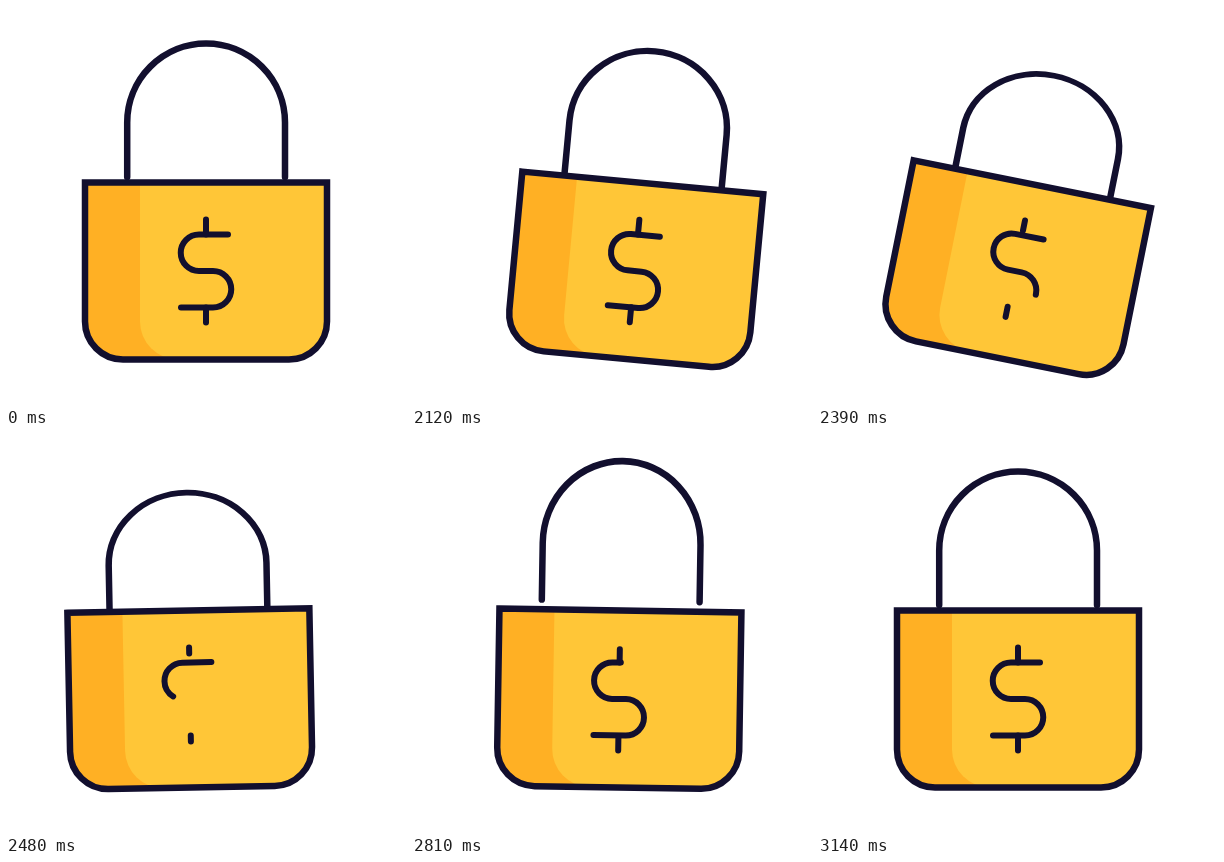
Recreate the animation shown at these times as an HTML page. Size 400 by 400 pixels, loop 3.17 s.

```html
<!DOCTYPE html>
<html lang="en">
<head>
<meta charset="utf-8">
<title>Swinging bag</title>
<style>
  html, body { margin: 0; width: 100%; height: 100%; overflow: hidden; background: #fff; }
  svg { display: block; width: 100vw; height: 100vh; }
</style>
</head>
<body>
<svg viewBox="0 0 400 400">
  <g id="bag" fill="none" stroke="#120f2e" stroke-width="6.5">
    <path id="handle" stroke-linecap="round"
      d="M121.2 171V116.5A78.9 79 0 0 1 279 116.5V171"/>
    <path fill="#ffb024" stroke="none"
      d="M79 176.5H321V315.5A38 38 0 0 1 283 353.5H117A38 38 0 0 1 79 315.5Z"/>
    <path fill="#ffc637" stroke="none"
      d="M134 176.5H321V315.5A38 38 0 0 1 283 353.5H172A38 38 0 0 1 134 315.5Z"/>
    <path d="M79 176.5H321V315.5A38 38 0 0 1 283 353.5H117A38 38 0 0 1 79 315.5Z"/>
    <g id="dollar" stroke-width="6" stroke-linecap="round">
      <path pathLength="1" d="M222 228.5H193A18.25 18.25 0 0 0 193 265H207A18.25 18.25 0 0 1 207 301.5H175"/>
      <path pathLength="1" d="M200 213.5V228.5"/>
      <path pathLength="1" d="M200 301.5V316.5"/>
    </g>
  </g>
</svg>
<script>
const LOOP = 3170, START = 2030, STEP = 30;
const $ = id => document.getElementById(id);
const bag = $('bag'), handle = $('handle'), dollar = $('dollar');

// Keys: [step, value, slope]; slope defaults to 0
const tilt = [[-1, 0], [9.4, 16.2], [20, -15.7], [28, 4], [37, 0]];
const shift = [[-1, 0, 2.4], [5, 29], [16, -17], [24, 7.5], [37, 0]];
const stretch = [[-1, 1], [11.5, 0.875], [24.5, 1.056], [31, 0.978], [37, 1]];
const trimEnd = [[-1, 1], [8, 0.9, -0.034], [15, 0.4, -0.115], [18, 0, -0.15]];
const trimStart = [[18, 1, -0.2], [22, 0.32, -0.09], [30, 0.05, -0.015], [37, 0]];

// Cubic Hermite interpolation between keys
function at(keys, k) {
  const last = keys[keys.length - 1];
  if (k <= keys[0][0]) return keys[0][1];
  if (k >= last[0]) return last[1];
  const i = keys.findIndex(key => key[0] > k);
  const [k0, v0, s0 = 0] = keys[i - 1], [k1, v1, s1 = 0] = keys[i];
  const d = k1 - k0, u = (k - k0) / d, w = 1 - u;
  return v0 * w * w * (1 + 2 * u) + v1 * u * u * (3 - 2 * u)
    + d * u * w * (s0 * w - s1 * u);
}

function draw(t) {
  const k = Math.max(-1, Math.floor((t - START) / STEP));
  bag.setAttribute('transform', `translate(${at(shift, k)} 0) rotate(${at(tilt, k)} 200 265)`);
  handle.setAttribute('transform', `translate(0 265) scale(1 ${at(stretch, k)}) translate(0 -265)`);

  const from = k > 18 ? at(trimStart, k) : 0;
  const to = k > 18 ? 1 : at(trimEnd, k);
  const len = to - from;
  dollar.setAttribute('visibility', len > 0.001 ? 'visible' : 'hidden');
  dollar.setAttribute('stroke-dasharray', len > 0.999 ? 'none' : `${len} 3`);
  dollar.setAttribute('stroke-dashoffset', -from);
}

function tick() {
  draw(performance.now() % LOOP);
  requestAnimationFrame(tick);
}
tick();
</script>
</body>
</html>
```
